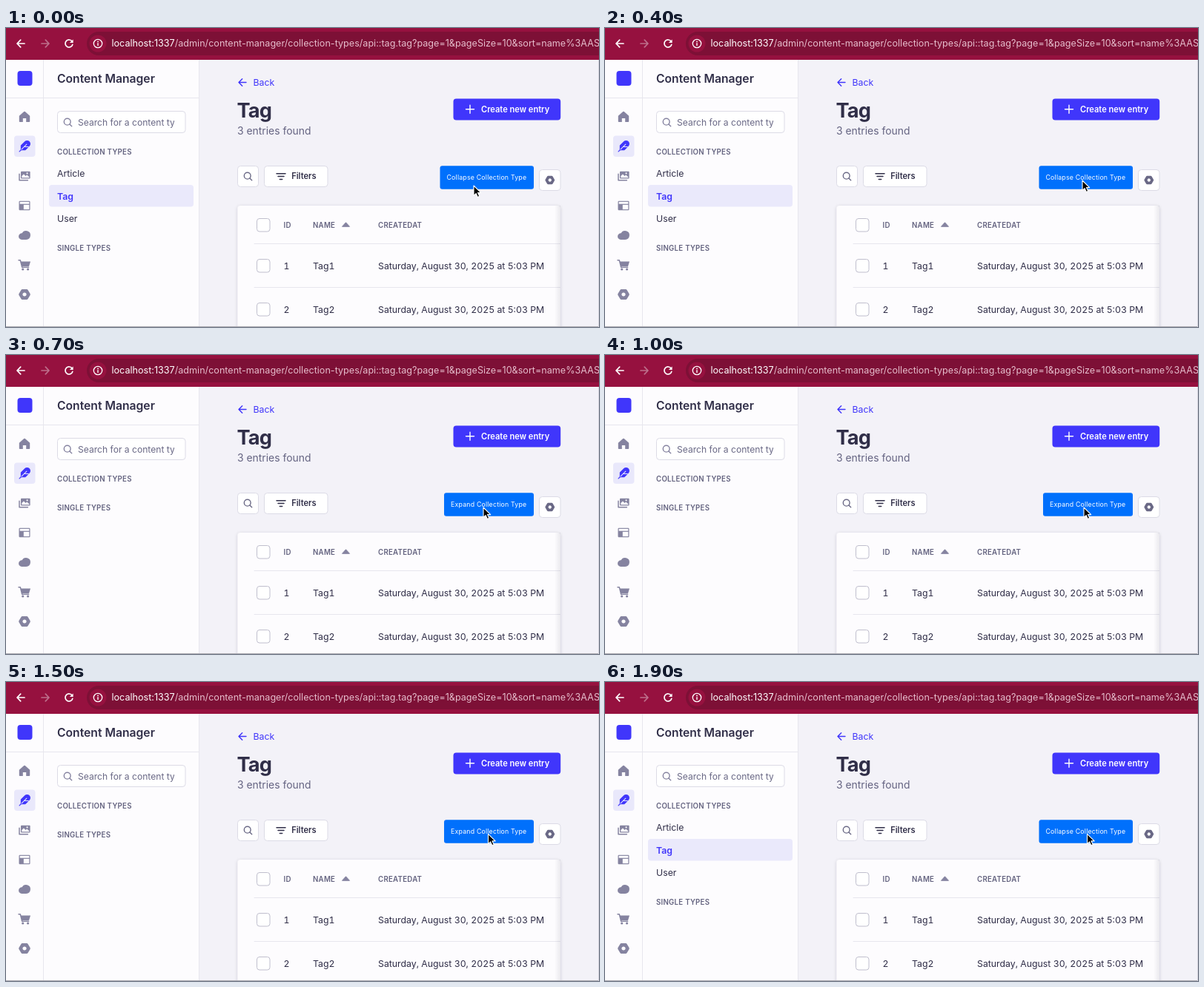
Animation of 800x404 px, one loop 2000 ms. Source, as an HTML page:

```html
<!DOCTYPE html>
<html lang="en">
<head>
<meta charset="utf-8">
<title>Content Manager</title>
<style>
html, body { margin: 0; width: 100%; height: 100%; overflow: hidden; background: #f3f2f8; }
svg { display: block; width: 100vw; height: 100vh; }
text { font-family: Inter, "Open Sans", sans-serif; font-size: 12.3px; fill: #302e48; white-space: pre; }
.caps { font-size: 9.7px; font-weight: 600; letter-spacing: .25px; fill: #63627f; }
.bold { font-size: 11.1px; font-weight: 600; }
.pill { font-size: 8.8px; letter-spacing: .19px; fill: #fff; }
.cell { font-variant-numeric: tabular-nums; }
.line { fill: none; stroke-linecap: round; stroke-linejoin: round; }
</style>
</head>
<body>
<svg id="stage" viewBox="0 0 800 404" preserveAspectRatio="none">
  <defs>
    <clipPath id="field"><rect x="90" y="114" width="137" height="27"/></clipPath>
    <clipPath id="view"><rect y="42" width="800" height="362"/></clipPath>
    <linearGradient id="fade"><stop offset="0" stop-color="#32324d" stop-opacity="0"/><stop offset="1" stop-color="#32324d" stop-opacity=".09"/></linearGradient>
    <filter id="soft" x="-5%" y="-5%" width="110%" height="110%"><feDropShadow dx="0" dy="1" stdDeviation="2" flood-color="#212134" flood-opacity=".18"/></filter>
    <path id="cog" d="M6 0 3 5.2H-3L-6 0-3 -5.2H3ZM4.4 0A4.4 4.4 0 1 0 -4.4 0 4.4 4.4 0 1 0 4.4 0Z"
      fill="currentColor" fill-rule="evenodd" stroke="currentColor" stroke-width="3.6" stroke-linejoin="round"/>
    <g id="lens" class="line" stroke="currentColor" stroke-width="1.4"><circle cx="-.8" cy="-.8" r="4.4"/><path d="M2.4 2.4 5.2 5.2"/></g>
    <path id="arrow" class="line" stroke="currentColor" d="M5 0H-5M-.3 -4.8-5 0-.3 4.8"/>
  </defs>
  <g id="page"></g>
  <g id="list"></g>
  <text id="single" class="caps" x="69" y="301">SINGLE TYPES</text>
  <rect id="toggle" y="186.3" height="31.4" rx="3" fill="#0070fc"/>
  <text id="label" class="pill" y="205.3"></text>
  <path id="cursor" d="M0 0V13.4L3.1 10.6 5.3 15.4 7.7 14.3 5.5 9.6H9.7Z" fill="#000" stroke="#fff" stroke-width="1.1" stroke-linejoin="round"/>
  <path d="M0 403.5H800" stroke="#aaa9b0"/>
  <path d="M799.5 43V404" stroke="#d6d5de"/>
</svg>
<script>
const $ = id => document.getElementById(id);
const INK = '#302e48', GREY = '#8583a0', BLUE = '#4036fb', EDGE = '#dcdbe6', RULE = '#e7e6ee';
const PANEL = '#fdfcfe', TILE = '#e9e8fb';

const attrs = o => Object.entries(o).map(([k, v]) => `${k}="${v}"`).join(' ');
const rect = (x, y, width, height, fill, more = {}) =>
  `<rect ${attrs({ x, y, width, height, fill, ...more })}/>`;
const text = (x, y, s, more = {}) => `<text ${attrs({ x, y, ...more })}>${s}</text>`;
const caps = (x, y, s) => text(x, y, s, { class: 'caps' });
const path = (d, more = {}) => `<path ${attrs({ d, ...more })}/>`;
const line = (d, stroke, width = 1) => path(d, { class: 'line', stroke, 'stroke-width': width });
const use = (id, x, y, color, more = {}) =>
  `<use ${attrs({ href: '#' + id, transform: `translate(${x} ${y})`, color, ...more })}/>`;
const at = (x, y, s, scale = 1) => `<g transform="translate(${x} ${y}) scale(${scale})">${s}</g>`;
const box = (x, y, w, h, r = 4) => rect(x + .5, y + .5, w - 1, h - 1, '#fff', { rx: r, stroke: EDGE });
const check = y => rect(338.5, y - 8.5, 17.5, 17.5, '#fff', { rx: 3.5, stroke: '#bfbecd' });

function toolbar() {
  const host = 'localhost:1337';
  const rest = '/admin/content-manager/collection-types/api::tag.tag?page=1&amp;pageSize=10&amp;sort=name%3AASC';
  return rect(0, 0, 800, 43, '#96113f')
    + rect(109, 5, 720, 32, '#7d1036', { rx: 16 })
    + use('arrow', 20, 21, '#fff', { 'stroke-width': 1.7 })
    + use('arrow', 53, 21, '#bd6f8b', { 'stroke-width': 1.7, transform: 'translate(53 21) scale(-1 1)' })
    + at(85, 21, line('M4.3 -2.6A5 5 0 1 0 4.8 1.4', '#fff', 1.7) + path('M5.6 -5.6V-.9H.9Z', { fill: '#fff' }))
    + at(124, 21, '<circle r="11.5" fill="#96113f"/><circle r="5.7" fill="none" stroke="#fff" stroke-width="1.3"/>'
      + line('M0 -.2V2.6', '#fff', 1.4) + '<circle cy="-2.6" r=".9" fill="#fff"/>')
    + text(142.5, 25.4, `<tspan fill="#fff">${host}</tspan>${rest}`, { style: 'font-size:12.6px;fill:#e5bccb' });
}

function rail() {
  const fill = d => path(d, { fill: GREY });
  return rect(0, 42, 260, 362, PANEL)
    + line('M50.5 42V404M260.5 42V404M0 94.5H260', RULE)
    + rect(15.5, 58, 20, 20, BLUE, { rx: 4 })
    + at(25, 120, fill('M-7.2 -1.2 -.8 -6.9Q0 -7.5 .8 -6.9L7.2 -1.2V6.2Q7.2 7 6.4 7H2.2V2H-2.2V7H-6.4Q-7.2 7 -7.2 6.2Z'))
    + rect(11, 145.5, 28.5, 28.5, TILE, { rx: 4 })
    + at(25, 160, path('M5.8 -5.8A4 4 0 0 0 .2 -5.8L-4.2 -1.5Q-4.5 -1.2 -4.5 -.8V4.5H.8Q1.2 4.5 1.5 4.2L5.8 -.2A4 4 0 0 0 5.8 -5.8Z', { fill: BLUE })
      + line('M-6 6-4 4', BLUE, 1.1) + line('M-3.4 3.4 2.5 -2.5M-.5 .5H4.6', TILE, .9), 1.15)
    + at(25, 200, line('M-7 -2.8V5.8H4.4', GREY, 1.5)
      + path('M-4.2 -6.2H6.8Q7.6 -6.2 7.6 -5.4V2.8Q7.6 3.6 6.8 3.6H-4.2Q-5 3.6 -5 2.8V-5.4Q-5 -6.2 -4.2 -6.2Z', { fill: GREY })
      + path('M-3.7 1.6V.1L-1 -2.5 1.5 -.1 3.2 -1.6 6.3 1.3V2.3H-3.7Z', { fill: PANEL })
      + '<circle cx="3.6" cy="-3.7" r="1.1" fill="#fdfcfe"/>')
    + at(25, 240, rect(-7.5, -6.3, 15, 12.6, GREY, { rx: 1.2 })
      + rect(-6.3, -5.1, 12.6, 2.8, PANEL) + rect(-1.2, -1.1, 7.5, 6.2, PANEL))
    + at(25, 280, fill('M-3.8 6A4.35 4.35 0 1 1 -3.4 -2.7A6 6 0 1 1 2.2 6Z'))
    + at(25, 320, line('M-8 -6.2H-5.7L-3.3 3.3H5.6', GREY, 1.5) + fill('M-5.2 -4.4H8L6 2H-3.6Z')
      + '<circle cx="-2.3" cy="6" r="1.6" fill="#8583a0"/><circle cx="4.6" cy="6" r="1.6" fill="#8583a0"/>')
    + use('cog', 25, 360, GREY);
}

function sidebar() {
  return text(69, 74.3, 'Content Manager', { style: 'font-size:15.7px;font-weight:600' })
    + box(69, 112, 173.5, 30)
    + use('lens', 83.5, 127.5, GREY)
    + text(97, 131.6, 'Search for a content type', { 'clip-path': 'url(#field)', style: 'font-size:12.1px;fill:#6a6986' })
    + caps(69, 170.5, 'COLLECTION TYPES');
}

function head() {
  return use('arrow', 319, 73.5, BLUE, { 'stroke-width': 1.4 })
    + text(333.5, 78, 'Back', { style: `fill:${BLUE}` })
    + text(311.5, 121, 'Tag', { style: 'font-size:27.2px;font-weight:700;letter-spacing:-.8px' })
    + text(312, 144.4, '3 entries found', { style: 'font-size:13.9px;fill:#656482' })
    + rect(603.5, 95.5, 144.7, 29, BLUE, { rx: 4 })
    + line('M620.5 109.8H631.5M626 104.3V115.3', '#fff', 1.4)
    + text(641, 113.8, 'Create new entry', { class: 'bold', style: 'fill:#fff' })
    + box(312, 186, 29, 29) + use('lens', 326.5, 200.5, '#6a6986')
    + box(348, 186, 86.5, 29)
    + line('M365 196.8H377M367 200.6H375M369.3 204.4H372.7', INK, 1.5)
    + text(385.2, 204.4, 'Filters', { class: 'bold' })
    + box(719, 191, 29.5, 29)
    + use('cog', 733.8, 205.5, '#6a6986', { transform: 'translate(733.8 205.5) scale(.82)' });
}

function table() {
  const cell = (x, y, s) => text(x, y + 4.5, s, { class: 'cell' });
  const row = (n, y) => check(y) + cell(374.5, y, n) + cell(414, y, 'Tag' + n)
    + cell(502, y, 'Saturday, August 30, 2025 at 5:03 PM');
  return rect(312.5, 240, 435.5, 180, PANEL, { rx: 4, filter: 'url(#soft)' })
    + line('M335 291.5H748M335 350.5H748', RULE)
    + check(266) + caps(374.5, 269.5, 'ID') + caps(414, 269.5, 'NAME') + caps(502, 269.5, 'CREATEDAT')
    + path('M453.5 268.3 458.5 262.8 463.5 268.3Z', { fill: GREY, stroke: GREY, 'stroke-linejoin': 'round' })
    + row(1, 321) + row(2, 380)
    + rect(740, 240, 8, 164, 'url(#fade)');
}

$('page').innerHTML = rect(0, 0, 800, 404, '#f3f2f8') + rail() + sidebar()
  + `<g clip-path="url(#view)">${head()}${table()}</g>` + toolbar();
$('list').innerHTML = rect(58, 212, 195, 29.5, '#eae9fb', { rx: 4 })
  + text(69, 200.8, 'Article')
  + text(69, 231.6, 'Tag', { style: `font-weight:600;fill:${BLUE}` })
  + text(69, 262.4, 'User');

const LOOP = 2000, STEP = 100, CLOSE = 700, OPEN = 1900;
// time, x, y of the pointer tip
const track = [[0, 631, 213], [400, 644, 206], [700, 644, 206], [1000, 646, 206], [1300, 650.5, 205.3], [LOOP, 650.5, 205.3]];

function pointer(t) {
  const i = track.findIndex(k => k[0] > t);
  const [t0, x0, y0] = track[i - 1], [t1, x1, y1] = track[i];
  const p = (t - t0) / (t1 - t0), e = p * (2 - p);
  return [x0 + (x1 - x0) * e, y0 + (y1 - y0) * e];
}

function draw(ms) {
  const t = Math.floor((ms % LOOP) / STEP) * STEP;
  const closed = t >= CLOSE && t < OPEN;
  const left = closed ? 591 : 585.5;
  $('list').setAttribute('visibility', closed ? 'hidden' : 'visible');
  $('single').setAttribute('y', closed ? 210.4 : 301);
  $('toggle').setAttribute('x', left);
  $('toggle').setAttribute('width', 712 - left);
  $('label').setAttribute('x', left + 9);
  $('label').textContent = (closed ? 'Expand' : 'Collapse') + ' Collection Type';
  $('cursor').setAttribute('transform', `translate(${pointer(t)})`);
}

const start = performance.now();
function tick() {
  draw(performance.now() - start);
  requestAnimationFrame(tick);
}
tick();
</script>
</body>
</html>
```
